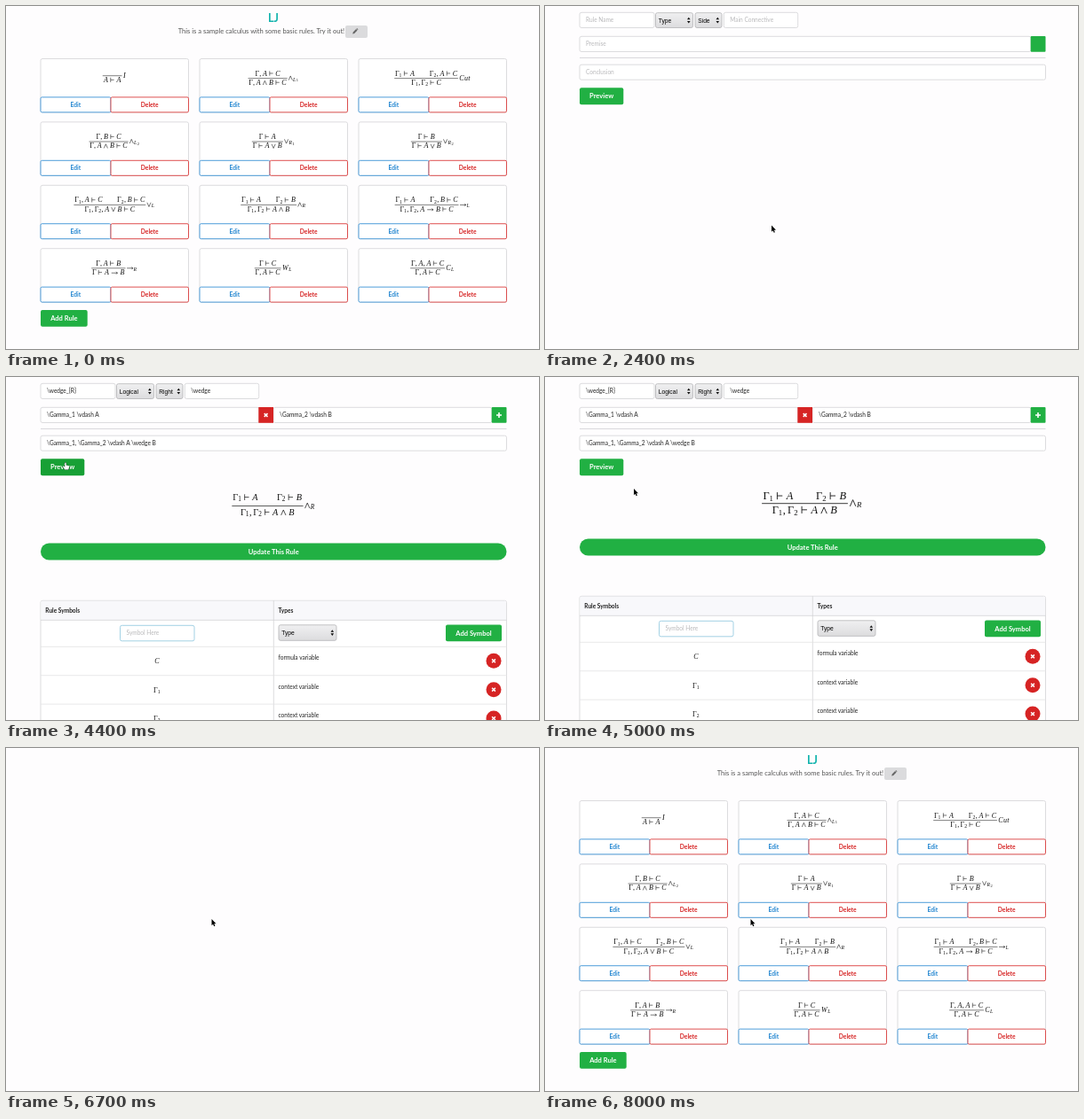
Animation, 600 px wide and 387 px high, one loop 8100 ms. Source, as an HTML page:

```html
<!DOCTYPE html>
<html lang="en">
<head>
<meta charset="utf-8">
<title>Sequent calculus editor</title>
<style>
  html, body { margin: 0; width: 100%; height: 100%; overflow: hidden; background: #fefdfe; }
  svg { display: block; width: 100%; height: 100%; }
  text { font-family: Lato, sans-serif; white-space: pre; }
  .math { font-family: "Liberation Serif", serif; fill: #111; }
  .menu { font-family: "Liberation Sans", sans-serif; }
</style>
</head>
<body>
<svg id="stage" viewBox="0 0 600 387"></svg>
<script>
const LOOP = 8100, STEP = 100;
const GREEN = '#21b043', DARK_GREEN = '#17a035', RED = '#d62424', BLUE = '#2185d0';
const LINE = '#d3d3d6', INK = '#222';
const stage = document.getElementById('stage');

// Rules in TeX; "|" marks where the raw text wraps.
const rules = String.raw`$$\frac{}{A \vdash A}I$$
$$\frac{\Gamma, A \vdash C}{\Gamma, A \wedge B|\vdash C}\wedge_{L_1}$$
$$\frac{\Gamma_1 \vdash A \quad \quad \Gamma_2,|A \vdash C}{\Gamma_1, \Gamma_2 \vdash C}Cut$$
$$\frac{\Gamma, B \vdash C}{\Gamma, A \wedge B|\vdash C}\wedge_{L_2}$$
$$\frac{\Gamma\vdash A}{\Gamma\vdash A \vee|B}\vee_{R_1}$$
$$\frac{\Gamma \vdash B}{\Gamma \vdash A \vee|B}\vee_{R_2}$$
$$\frac{\Gamma_1, A \vdash C \quad \quad|\Gamma_2, B \vdash C}{\Gamma_1, \Gamma_2, A \vee|B \vdash C}\vee_{L}$$
$$\frac{\Gamma_1 \vdash A \quad \quad \Gamma_2|\vdash B}{\Gamma_1, \Gamma_2 \vdash A \wedge|B}\wedge_{R}$$
$$\frac{\Gamma_1 \vdash A \quad \quad \Gamma_2,|B \vdash C}{\Gamma_1, \Gamma_2, A \rightarrow B|\vdash C}\rightarrow_{L}$$
$$\frac{\Gamma, A \vdash B}{\Gamma \vdash A|\rightarrow B}\rightarrow_{R}$$
$$\frac{\Gamma \vdash C}{\Gamma, A \vdash|C}W_{L}$$
$$\frac{\Gamma, A, A \vdash C}{\Gamma, A \vdash|C}C_{L}$$`.split('\n').map(parseRule);

function parseRule(raw) {
  const names = { Gamma: 'Γ', vdash: '⊢', wedge: '∧', vee: '∨', rightarrow: '→', quad: '~', frac: '' };
  const flat = raw.replace(/\\([A-Za-z]+)/g, (_, name) => names[name]).replace(/[\s|$]/g, '');
  const [, num, den, label] = flat.match(/^\{(.*?)\}\{(.*?)\}(.*)$/);
  return { lines: raw.split('|'), num, den, label };
}

// Basic shapes
function rect(x, y, w, h, fill, stroke = 'none', r = 2) {
  return `<rect x="${x}" y="${y}" width="${w}" height="${h}" rx="${r}" fill="${fill}" stroke="${stroke}" stroke-width=".8"/>`;
}
function line(d, color, width = 0.8, extra = '') {
  return `<path d="${d}" fill="none" stroke="${color}" stroke-width="${width}" ${extra}/>`;
}
// y is the middle of the capitals
function label(x, y, s, { size = 6.55, bold = false, fill = INK, mid = false, cls = '' } = {}) {
  return `<text class="${cls}" x="${x}" y="${y + size * 0.36}" font-size="${size}" font-weight="${bold ? 700 : 400}"` +
    ` fill="${fill}" text-anchor="${mid ? 'middle' : 'start'}">${s}</text>`;
}
function button(x, y, w, h, s, fill = GREEN, r = 2) {
  return rect(x, y, w, h, fill, 'none', r) +
    label(x + w / 2, y + h / 2, s, { size: 7.55, bold: true, fill: '#fff', mid: true });
}
function cross(x, y, d = 1.9) {
  return line(`M${x - d} ${y - d}L${x + d} ${y + d}M${x - d} ${y + d}L${x + d} ${y - d}`, '#fff', 1.5);
}
function input(x, y, w, h, hint, value, border = LINE) {
  return rect(x, y, w, h, '#fff', border) +
    label(x + 7, y + h / 2, value || hint, { fill: value ? INK : '#b9b9bb' });
}
function select(x, y, w, h, s) {
  const ax = x + w - 4.7, ay = y + h / 2;
  return rect(x, y, w, h, 'url(#menu)', '#b4b4b7') +
    label(x + 3.2, ay, s, { size: 6.7, fill: '#000', cls: 'menu' }) +
    `<path d="M${ax - 1.8} ${ay - 0.8}h3.6l-1.8 -2.6zM${ax - 1.8} ${ay + 0.8}h3.6l-1.8 2.6z" fill="#111"/>`;
}

// Math: glyph widths in em, operators as [width, side space, path]
const widths = { Γ: 0.625, A: 0.75, B: 0.759, C: 0.74, I: 0.47, W: 0.97, L: 0.681, R: 0.76, u: 0.572, t: 0.361, 1: 0.5, 2: 0.5, ',': 0.278, '~': 1.075 };
const operators = {
  '⊢': [0.611, 0.278, 'M.06 -.69V0M.06 -.35H.56'],
  '∧': [0.667, 0.222, 'M.06 .02L.333 -.6L.61 .02'],
  '∨': [0.667, 0.222, 'M.06 -.6L.333 .02L.61 -.6'],
  '→': [1, 0.278, 'M.05 -.25H.93M.74 -.43Q.8 -.29 .95 -.25Q.8 -.21 .74 -.07']
};

function typeset(s, em, tight = false) {
  const glyphs = [];
  let x = 0, depth = 0;
  for (const ch of s) {
    if (ch === '_') { depth++; continue; }
    if ('{}'.includes(ch)) continue;
    const k = em * [1, 0.707, 0.55][depth], dy = em * [0, 0.15, 0.26][depth];
    const op = operators[ch];
    const side = op && !tight ? op[1] * k : 0;
    const w = (op ? op[0] : widths[ch]) * k;
    glyphs.push({ ch, x: x + side, dy, k, w });
    x += w + 2 * side + (ch === ',' ? 0.167 * k : 0) + (depth ? 0.06 * em : 0);
    if (/\d/.test(ch)) depth = 0;
  }
  return { glyphs, w: x };
}

function drawMath({ glyphs }, x0, y0) {
  return glyphs.map(({ ch, x, dy, k, w }) => {
    const gx = x0 + x, gy = y0 + dy;
    if (ch === '~') return '';
    if (operators[ch]) return line(operators[ch][2], '#111', 0.075, `transform="translate(${gx} ${gy}) scale(${k})"`);
    const style = /[A-Z]/i.test(ch) ? 'italic' : 'normal';
    return `<text class="math" x="${gx + w / 2}" y="${gy}" font-size="${k * 1.06}" font-style="${style}" text-anchor="middle">${ch}</text>`;
  }).join('');
}

function inference(rule, cx, bar, em, up = 0.39, down = 0.96) {
  const num = typeset(rule.num, em), den = typeset(rule.den, em), name = typeset(rule.label, em, true);
  const w = Math.max(num.w, den.w) + 0.2 * em, gap = 0.15 * em;
  const x = cx - (w + gap + name.w) / 2, mid = x + w / 2;
  return drawMath(num, mid - num.w / 2, bar - up * em) +
    drawMath(den, mid - den.w / 2, bar + down * em) +
    line(`M${x} ${bar}h${w}`, '#222', em * 0.075) +
    drawMath(name, x + w + gap, bar + 0.25 * em);
}

// Page parts
function header() {
  return label(301, 13.8, 'LJ', { size: 12.5, bold: true, fill: '#12b3ad', mid: true }) +
    label(193.7, 28.2, 'This is a sample calculus with some basic rules. Try it out!', { size: 7.55, fill: '#555' }) +
    rect(382, 22, 25, 14, '#dbdbdd') +
    '<path d="M390.2 31.4l.5 -1.9l3.4 -3.4l1.4 1.4l-3.4 3.4zM394.5 25.7l.6 -.6l1.4 1.4l-.6 .6z" fill="#666"/>';
}

function card(x, y, h) {
  const by = y + h - 17, buttonText = { size: 6.7, bold: true, mid: true };
  return rect(x, y, 166.5, h, '#fff', LINE) +
    rect(x, by, 79, 17, '#fff', BLUE, 1.5) +
    rect(x + 79, by, 87.5, 17, '#fff', RED, 1.5) +
    label(x + 39.3, by + 8.5, 'Edit', { ...buttonText, fill: BLUE }) +
    label(x + 122.7, by + 8.5, 'Delete', { ...buttonText, fill: RED });
}

function ruleList(rendered) {
  const rawTops = [59.3, 119, 178, 246], rawHeights = [47.7, 47.2, 56, 47];
  return rules.map((rule, i) => {
    const row = Math.floor(i / 3), x = 39 + (i % 3) * 179;
    if (rendered) {
      const y = 59.5 + row * 71.4;
      return card(x, y, 60.4) + inference(rule, x + 83, y + (rule.num ? 22.1 : 19.2), 7.6);
    }
    const y = rawTops[row];
    return card(x, y, rawHeights[row]) +
      rule.lines.map((s, n) => label(x + 6.4, y + 11.6 + n * 9.2, s)).join('');
  }).join('');
}

function symbolTable(y) {
  const bold = { bold: true };
  const rows = [['C', 'formula variable'], ['Γ_1', 'context variable'], ['Γ_2', 'context variable']];
  let out = rect(39, y, 524.5, 200, '#fff', LINE) + rect(39.4, y + 0.4, 523.7, 21.6, '#f8f8fb', 'none', 1) +
    line(`M39 ${y + 22}H563.5M301.3 ${y}V400`, LINE) +
    label(44.3, y + 11, 'Rule Symbols', bold) + label(306.5, y + 11, 'Types', bold) +
    input(128.5, y + 28, 83.5, 17.5, 'Symbol Here', '', '#8cc6de') +
    select(307, y + 27.5, 65, 17.5, 'Type') +
    button(495, y + 27.3, 63, 18.7, 'Add Symbol');
  rows.forEach(([symbol, type], i) => {
    const top = y + 52 + i * 32.4, m = typeset(symbol, 7.6);
    out += line(`M39 ${top}H563.5`, '#e2e2e4') +
      drawMath(m, 170 - m.w / 2, top + 19) +
      label(306.5, top + 12.6, type) +
      `<circle cx="549" cy="${top + 16}" r="8.5" fill="${RED}"/>` + cross(549, top + 16);
  });
  return out;
}

function form(filled, hover) {
  const v = s => filled ? s : '';
  let out = input(39, 7.3, 84, 17.2, 'Rule Name', v('\\wedge_{R}')) +
    select(124.5, 7.7, 42, 16.8, filled ? 'Logical' : 'Type') +
    select(169, 7.7, 30, 16.8, filled ? 'Right' : 'Side') +
    input(201.3, 7.3, 83.4, 17.2, 'Main Connective', v('\\wedge')) +
    input(39, 34.3, filled ? 246 : 508, 17.2, 'Premise', v('\\Gamma_1 \\vdash A'));
  if (filled) {
    out += input(301, 34.3, 246, 17.2, '', '\\Gamma_2 \\vdash B') +
      rect(284.3, 34, 16.7, 17.8, RED, 'none', 0) + cross(292.6, 43);
  }
  out += rect(546.7, 34, 16.8, 17.8, GREEN, 'none', 1);
  if (filled) out += line('M552 43h6M555 40v6', '#fff', 1.6);
  return out + line('M39 58.5H563.5', '#d0d0d3') +
    input(39, 66.2, 524.5, 17, 'Conclusion', v('\\Gamma_1, \\Gamma_2 \\vdash A \\wedge B')) +
    button(39, 92.3, 49.3, 18.9, 'Preview', hover ? DARK_GREEN : GREEN);
}

function preview(settled, hover) {
  const rule = rules[7], shift = settled ? 0 : 5;
  return (settled ? inference(rule, 300.8, 142.7, 11.7) : inference(rule, 301.3, 145.5, 9.7, 0.67, 1.06)) +
    button(39, 182.5 + shift, 524.5, 19, 'Update This Rule', hover ? DARK_GREEN : GREEN, 9.5) +
    symbolTable(247.3 + shift);
}

// Pointer: [time, x, y]
const path = [
  [100, 330, 384], [500, 300, 325], [1000, 257, 251], [1500, 255, 247.5], [2400, 255, 247.5],
  [3200, 98, 118], [3500, 84, 97], [3900, 67, 96.5], [4500, 67, 96.5], [5000, 100, 126], [5600, 231.5, 193]
];
function pointerAt(t) {
  if (t < path[0][0]) return null;
  const i = path.findIndex(p => p[0] > t);
  if (i < 0) return path[path.length - 1].slice(1);
  const [t0, x0, y0] = path[i - 1], [t1, x1, y1] = path[i];
  const k = (t - t0) / (t1 - t0);
  return [x0 + (x1 - x0) * k, y0 + (y1 - y0) * k];
}

// Name of the control under the pointer
function targetAt(t) {
  const p = pointerAt(t);
  const over = (x, y, w, h) => p && p[0] >= x && p[0] <= x + w && p[1] >= y && p[1] <= y + h;
  if (t < 1900) return over(218, 245, 79, 18) ? 'edit' : '';
  if (t < 2400 || t >= 6400) return '';
  if (over(39, 92, 49, 19)) return 'preview';
  return t >= 4200 && over(39, 182, 524, 19) ? 'update' : '';
}

function pointer(t) {
  const p = pointerAt(t);
  if (!p) return '';
  const hand = 'M-.7 .3Q0 -.5 .7 .3V3L3.4 3.6Q4.3 4 4 5.4L3.2 8H-.8L-2.8 5Q-2.6 4 -1.5 4.6L-.7 5.2Z';
  const arrow = 'M0 0V7.2L1.6 5.7L2.7 8.3L3.9 7.8L2.8 5.3H5Z';
  const isHand = targetAt(t) !== '';
  return `<path transform="translate(${p[0]} ${p[1]})" d="${isHand ? hand : arrow}" fill="${isHand ? '#fff' : '#000'}"` +
    ` stroke="${isHand ? '#111' : '#fff'}" stroke-width=".7" paint-order="stroke" stroke-linejoin="round"/>`;
}

function page(t) {
  if (t < 1900 || t >= 7600) return header() + ruleList(true) + button(39, 343, 52.7, 18.8, 'Add Rule');
  if (t < 2400) return '';
  if (t < 6400) {
    // buttons darken one step after the pointer arrives
    const hot = targetAt(t) === targetAt(t - STEP) ? targetAt(t) : '';
    return form(t >= 2500, hot === 'preview') + (t >= 4200 ? preview(t >= 4500, hot === 'update') : '');
  }
  if (t < 7000) return '';
  if (t < 7300) {
    return header() + button(39, 47, 52.7, 18.8, 'Add Rule') +
      `<svg width="600" height="163.4">${symbolTable(111)}</svg>`;
  }
  return header() + ruleList(false) + button(39, 302, 52.7, 19, 'Add Rule') + symbolTable(366.2);
}

const defs = '<defs><linearGradient id="menu" x2="0" y2="1"><stop stop-color="#f0f0f1"/>' +
  '<stop offset="1" stop-color="#dcdcde"/></linearGradient></defs>';
let shown = -1;
function frame() {
  const t = Math.floor(performance.now() % LOOP / STEP) * STEP;
  if (t !== shown) {
    shown = t;
    stage.innerHTML = defs + page(t) + pointer(t);
  }
  requestAnimationFrame(frame);
}
frame();
</script>
</body>
</html>
```
